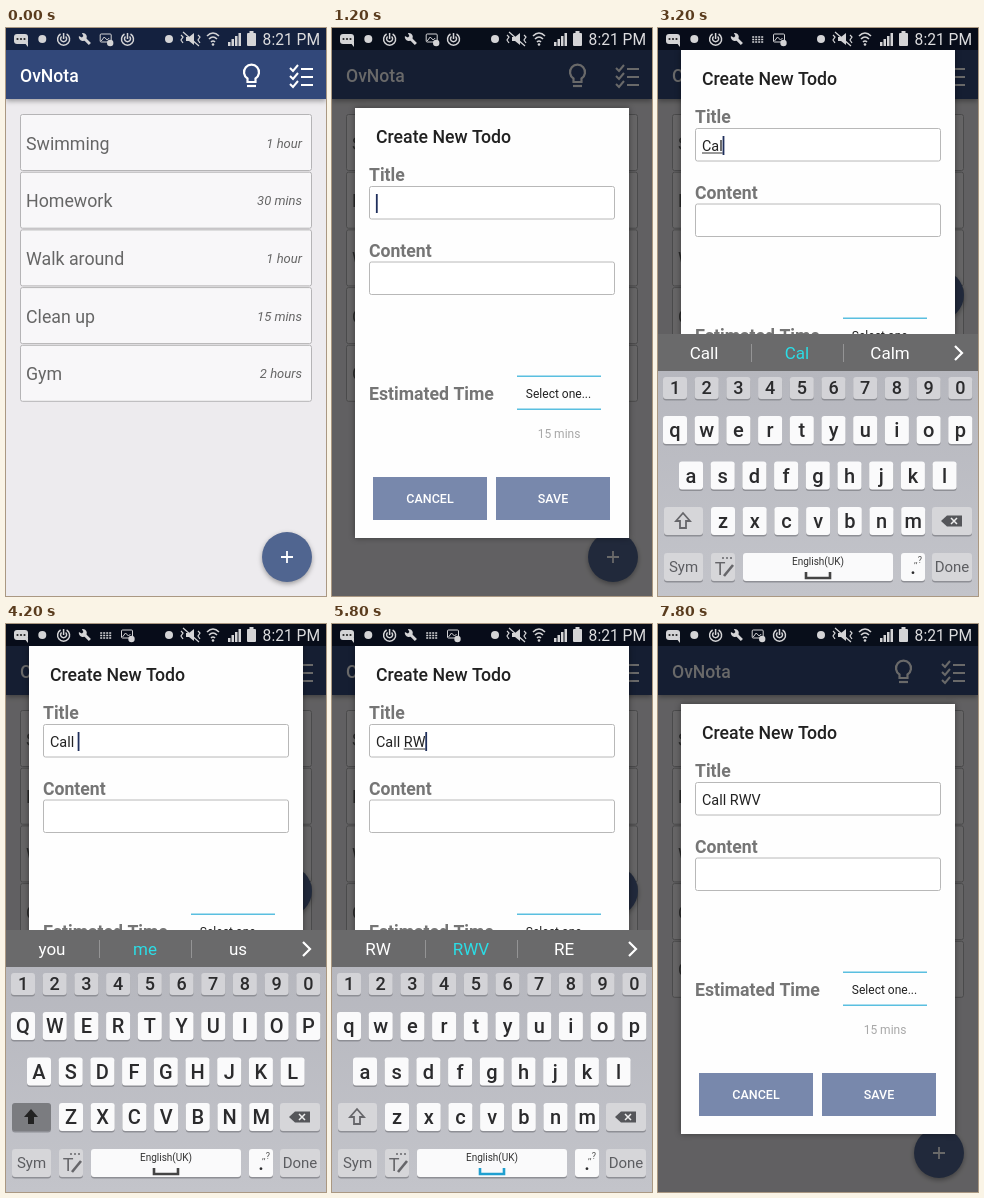
Write an HTML page with a canvas that moves like this. It is 320 by 568 pixels and loops after 8000 ms.

```html
<!DOCTYPE html>
<html lang="en">
<head>
<meta charset="utf-8">
<title>Todo list</title>
<style>
  html, body { margin: 0; width: 100%; height: 100%; overflow: hidden; background: #edebee; }
  canvas { display: block; width: 320px; height: 568px; }
</style>
</head>
<body>
<canvas id="stage"></canvas>
<script>
const LOOP = 8000, STEP = 200;
const canvas = document.getElementById('stage');
const c = canvas.getContext('2d');
const ratio = window.devicePixelRatio || 1;
canvas.width = 320 * ratio;
canvas.height = 568 * ratio;

// Timelines: [start time, value], each value held until the next one.
const timelines = {
  dialog:   [[0, 0], [1000, .5], [1200, 1]],
  shift:    [[0, 0], [2000, -30], [2200, -56], [2400, -58], [7600, -12], [7800, 0]],
  keyY:     [[0, 262], [2000, 90], [2200, 5.5], [2400, 0], [7400, 60], [7600, 262]],
  keyAlpha: [[0, 0], [2000, .3], [2200, .78], [2400, 1], [7400, .5], [7600, 0]],
  typed:    [[0, ''], [2800, 'C'], [3000, 'Ca'], [3200, 'Cal'], [3600, 'Call'], [3800, 'Call '],
             [4800, 'Call R'], [5400, 'Call RW'], [6400, 'Call RWV']],
  composing: [[0, true], [3800, false], [4800, true], [6400, false]],
  caps:     [[0, false], [2400, true], [2800, false], [4000, true], [4800, false],
             [5200, true], [5400, false], [6200, true], [6400, false]],
  guesses:  [[0, 'Tb1 I tovin.beld'], [2800, 'Can C Come'], [3000, 'Can Ca Call'], [3200, 'Call Cal Calm'],
             [3600, 'Called Call Calls'], [3800, 'you me us'], [4800, 'Right R Really'],
             [5400, 'RW RWV RE'], [6400, 'DEC RWV DEV']],
  caret:    [[0, true], [7400, false]],
  accent:   [[0, false], [5400, true]]
};

function stateAt(time) {
  const state = {};
  for (const name in timelines)
    state[name] = timelines[name].filter(([start]) => start <= time).pop()[1];
  return state;
}

function box(x, y, w, h, fill, stroke, radius = 0) {
  c.beginPath();
  c.roundRect(x, y, w, h, radius);
  if (fill) { c.fillStyle = fill; c.fill(); }
  if (stroke) { c.strokeStyle = stroke; c.lineWidth = 1; c.stroke(); }
}

function disc(x, y, r, fill) {
  c.beginPath();
  c.arc(x, y, r, 0, 7);
  c.fillStyle = fill;
  c.fill();
}

function path(d, color, width = 1.5, fill = false) {
  const p = new Path2D(d);
  c.strokeStyle = c.fillStyle = color;
  c.lineWidth = width;
  fill ? c.fill(p) : c.stroke(p);
}

function text(str, x, y, size, color, align = 'left', style = '') {
  c.font = `${style} ${size}px Roboto, sans-serif`;
  c.textAlign = align;
  c.fillStyle = color;
  c.fillText(str, x, y);
}

function at(x, y, draw) {
  c.save();
  c.translate(x, y);
  draw();
  c.restore();
}

const gray = '#d4d4d6';
const icons = {
  message() {
    box(-7, -5, 14, 10, gray, null, 3);
    path('M3 3 H7 V8Z', gray, 1, true);
    for (const x of [-3.5, 0, 3.5]) disc(x, 0, 1.1, '#222');
  },
  dot() { disc(0, 0, 4, gray); },
  ring() {
    path('M3 -5 A6 6 0 1 1 -3 -5', gray, 1.5);
    path('M-2 -2.5 A3 3 0 1 0 2 -2.5 M0 -6 V0', gray, 1.5);
  },
  wrench() {
    path('M-1 -1 L5 5', gray, 3);
    path('M-6 -3 A4 4 0 1 0 -3 -6 L-1.5 -3 L-3 -1.5Z', gray, 1, true);
  },
  picture() {
    box(-6, -5, 11, 8, null, gray, 1);
    path('M-5 2 L-2 -2 L1 1 L3 -1', gray, 1);
    disc(4, 4, 3.2, gray);
  },
  keyboard() {
    c.setLineDash([2, 1]);
    path('M-6 -2 H6 M-6 .5 H6 M-6 3 H6', gray, 1.6);
  }
};

function statusBar(keyboardOpen) {
  const names = ['message', 'dot', 'ring', 'wrench',
    ...(keyboardOpen ? ['keyboard', 'picture'] : ['picture', 'ring'])];
  names.forEach((name, i) => at(15 + i * 21.3, 11, icons[name]));
  disc(163, 11, 4, gray);
  path('M180 9 H183 L188 5 V17 L183 13 H180Z', gray, 1, true);
  path('M177 4 L193 18 M175 7 L177 9 L175 12 L177 15 M192 7 L194 9 L192 12 L194 15', gray, 1.2);
  path('M201 8 Q207 2 213 8 M203 11 Q207 7 211 11 M205 14 Q207 12 209 14', gray, 1.6);
  disc(207, 16.5, 1.3, gray);
  for (let i = 0; i < 4; i++) box(222 + i * 3.5, 14 - i * 3, 2.5, 4 + i * 3, gray);
  box(241, 5, 9, 13, gray, null, 1);
  box(243.5, 3, 4, 2, gray);
  text('8:21 PM', 314, 17, 15.6, '#dcdcde', 'right');
}

const todos = [['Swimming', '1 hour'], ['Homework', '30 mins'], ['Walk around', '1 hour'],
  ['Clean up', '15 mins'], ['Gym', '2 hours']];

function listScreen(fabY) {
  box(0, 0, 320, 568, '#edebee');
  todos.forEach(([name, length], i) => {
    const y = 86.5 + i * 57.7;
    box(14.5, y, 291, 56, '#f8f7f9', '#b5b4b6', 2);
    text(name, 20, y + 35, 17.8, '#666');
    text(length, 296, y + 33, 13, '#666', 'right', 'italic');
  });

  c.save();
  c.shadowColor = 'rgba(0,0,0,.35)';
  c.shadowBlur = 5 * ratio;
  c.shadowOffsetY = 2 * ratio;
  box(0, 0, 320, 71, '#32487a');
  disc(281, fabY, 25, '#506590');
  c.restore();
  path(`M275 ${fabY} H287 M281 ${fabY - 6} V${fabY + 6}`, '#fff', 1.8);

  box(0, 0, 320, 22, '#14213f');
  text('OvNota', 14, 54, 17.6, '#fff', 'left', '500');
  path('M241.5 54 V50.5 A7.5 7.5 0 1 1 249.5 50.5 V54Z', '#fff', 2.2);
  path('M241 58 H250', '#fff', 2.2);
  for (const y of [40, 48, 56])
    path(`M284 ${y} L287 ${y + 3} L292 ${y - 3} M295 ${y + 1} H307`, '#fff', 2);
}

function field(label, y, value) {
  text(label, 37, y, 17.6, '#757575', 'left', 'bold');
  box(37.5, y + 5.5, 245, 32.5, '#fff', '#b8b8b8', 2);
  if (value) text(value, 44, y + 28, 14.4, '#222');
}

function dialog({ dialog: alpha, shift, typed, composing, caret, keyAlpha }) {
  c.save();
  c.globalAlpha = alpha;
  c.translate(0, shift);
  c.shadowColor = 'rgba(0,0,0,.4)';
  c.shadowBlur = 6 * ratio;
  box(23, 80, 274, 430, '#fefefe');
  c.shadowColor = 'transparent';

  text('Create New Todo', 44, 115, 17.7, '#212121', 'left', '500');
  field('Title', 153, typed);
  field('Content', 228.5);
  c.font = '14.4px Roboto, sans-serif';
  const end = 44 + c.measureText(typed).width;
  if (typed && composing && keyAlpha) {
    const start = 44 + c.measureText(typed.slice(0, typed.lastIndexOf(' ') + 1)).width;
    path(`M${start} 183 H${end}`, '#333', 1);
  }
  if (caret) path(`M${end + .8} 166 V185`, '#1f2f5c', 1.8);

  text('Estimated Time', 37, 371.5, 17.7, '#757575', 'left', 'bold');
  path('M185 348.2 H269 M185 381.2 H269', '#5abfe0', 1.5);
  text('Select one...', 226.5, 369.5, 12, '#222', 'center');
  text('15 mins', 227, 409.5, 12, '#a8a8a8', 'center');
  for (const [label, x] of [['CANCEL', 41], ['SAVE', 164]]) {
    box(x, 449, 114, 43, '#7888ac');
    text(label, x + 57, 475, 12.5, '#fff', 'center', '500');
  }
  c.restore();
}

const letterKey = '#fafafb', sideKey = '#d6d6d9', numberKey = '#d3d3d7';

function key(x, y, w, h, fill, label = '', size = 20, color = '#2b2b2d', weight = '500') {
  box(x, y + 1.5, w, h, '#8e8f95', null, 3);
  box(x, y, w, h, fill, null, 3);
  text(label, x + w / 2, y + h / 2 + size * .35, size, color, 'center', weight);
}

function keyRow(chars, firstCenter, y, h, fill, size) {
  [...chars].forEach((ch, i) => key(firstCenter - 12 + i * 31.7, y, 24, h, fill, ch, size));
}

function keyboard({ keyY, keyAlpha, caps, guesses, accent }) {
  c.save();
  c.globalAlpha = keyAlpha;
  c.translate(0, keyY);
  const back = c.createLinearGradient(0, 343, 0, 568);
  back.addColorStop(0, '#b6b7be');
  back.addColorStop(1, '#c3c4ca');
  box(0, 343, 320, 225, back);
  box(0, 306, 320, 37, '#6a6a6b');
  guesses.split(' ').forEach((word, i) =>
    text(word, 46 + i * 93, 331, word.length > 8 ? 14.5 : 17, i === 1 ? '#2bdde6' : '#fff', 'center'));
  path('M93.5 316 V334 M185.5 316 V334', '#949495', 1);
  path('M297 318 L304 325 L297 332', '#fff', 2.2);

  const shown = letters => caps ? letters.toUpperCase() : letters;
  keyRow('1234567890', 17, 349, 22, numberKey, 18);
  keyRow(shown('qwertyuiop'), 17, 388, 28, letterKey);
  keyRow(shown('asdfghjkl'), 33, 433.5, 28, letterKey);
  keyRow(shown('zxcvbnm'), 65, 479, 28, letterKey);

  key(6, 479, 39, 28, caps ? '#7b7c80' : sideKey);
  path('M25 485 L32 493 H28 V500 H22 V493 H18Z', caps ? '#222' : '#66666a', 1.8, caps);
  key(274, 479, 40, 28, sideKey);
  path('M283 493 L289 487.5 H304 V498.5 H289Z', '#55565a', 1, true);
  path('M293 490 L299 496 M299 490 L293 496', '#eee', 1.5);

  key(6, 525, 39, 28, sideKey, 'Sym', 15, '#5c5d61', '400');
  key(53, 525, 24, 28, sideKey, '', 18);
  text('T', 62, 547, 18, '#66666a', 'center');
  path('M66 548 L75 537', '#66666a', 2.6);
  for (const x of [65, 69, 73]) disc(x, 530, 1, '#66666a');
  key(85, 525, 150, 28, letterKey);
  text('English(UK)', 160, 537, 10, '#333', 'center');
  path('M148 544 V550 H172 V544', accent ? '#1f9fd0' : '#444', 2.6);
  key(243, 525, 24, 28, letterKey, '.', 20);
  text(',,?', 260, 535, 9, '#555', 'center');
  key(274, 525, 40, 28, sideKey, 'Done', 15, '#5c5d61', '400');
  c.restore();
}

function draw(time) {
  const state = stateAt(time);
  c.setTransform(ratio, 0, 0, ratio, 0, 0);
  listScreen(state.keyAlpha ? 267 : 529);
  if (state.dialog) {
    box(0, 0, 320, 568, `rgba(0,0,0,${.59 * state.dialog})`);
    dialog(state);
  }
  if (state.keyAlpha) {
    box(0, 0, 320, 22, '#070c19');
    keyboard(state);
  }
  statusBar(state.keyAlpha > 0);
}

function tick() {
  draw(Math.floor(performance.now() % LOOP / STEP) * STEP);
  requestAnimationFrame(tick);
}
tick();
</script>
</body>
</html>
```
